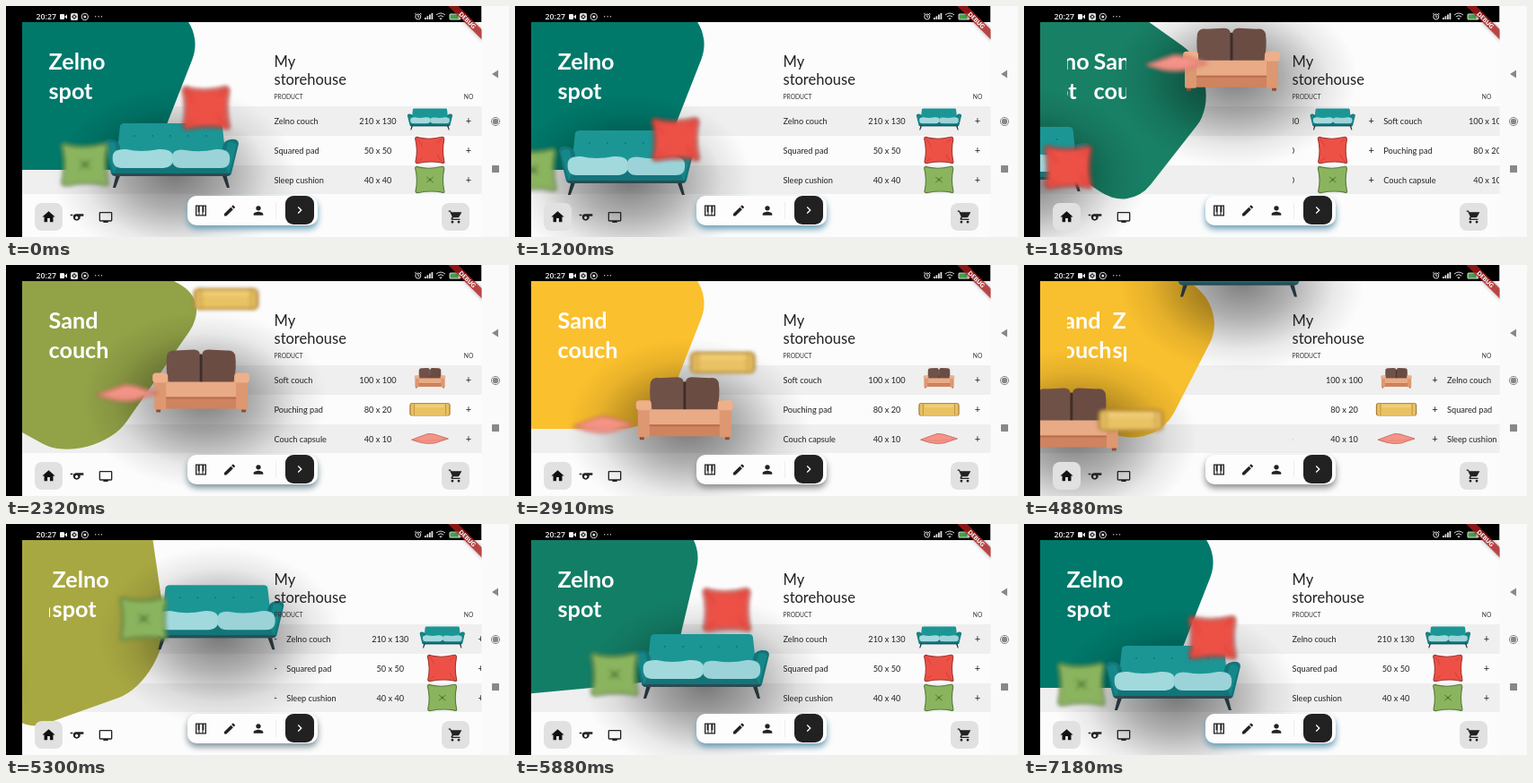
These frames come from a looping animation (560 px wide and 258 px high, 7.26 s). An HTML page with a canvas:

```html
<!DOCTYPE html>
<html lang="en">
<head>
<meta charset="utf-8">
<title>Sofa store</title>
<style>
html, body { margin: 0; width: 100%; height: 100%; overflow: hidden; background: #fafafa; }
canvas { display: block; width: 560px; height: 258px; }
</style>
</head>
<body>
<canvas id="stage"></canvas>
<script>
const W = 560, H = 258, LOOP = 7260, PERIOD = 3200;
const canvas = document.getElementById('stage');
const ctx = canvas.getContext('2d');
const dpr = window.devicePixelRatio || 1;
canvas.width = W * dpr;
canvas.height = H * dpr;

// Drift of each piece around its resting place: [phase ms, dx, dy]
const PATHS = {
  sofa: [[1300, 40, -330], [1680, 55, -168], [1850, 55, -104], [2680, 24, -8], [3200, 0, 0],
    [3980, -18, 5], [4400, -60, 8], [4880, -123, 9], [5050, -186, 4], [5400, -330, -10]],
  right: [[1300, 10, -460], [1680, 22, -310], [1850, 27, -225], [2680, 13, -18], [3200, 0, 0],
    [3980, -13, 13], [4400, -44, 35], [4880, -105, 57], [5050, -173, 66], [5400, -330, 70]],
  left: [[1300, 80, -380], [1680, 92, -190], [1850, 83, -118], [2680, 23, -9], [3200, 0, 0],
    [3980, -24, 2], [4400, -68, 6], [4880, -150, 8], [5400, -350, 0]]
};

const TEAL = [0, 121, 107], YELLOW = [251, 192, 45];

const ROOMS = [
  {
    title: ['Zelno', 'spot'],
    sofa: [tealSofa, 184, 131], right: [redPad, 223, 114], left: [greenPad, 88, 177],
    rows: [
      ['Zelno couch', '210 x 130', tealSofa, 0.335, 114.5],
      ['Squared pad', '50 x 50', redPad, 0.63, 161],
      ['Sleep cushion', '40 x 40', greenPad, 0.63, 194]
    ]
  },
  {
    title: ['Sand', 'couch'],
    sofa: [sandSofa, 176, 128.5], right: [rollPad, 224, 116], left: [capsule, 87, 181.5],
    rows: [
      ['Soft couch', '100 x 100', sandSofa, 0.32, 115],
      ['Pouching pad', '80 x 20', rollPad, 0.63, 161],
      ['Couch capsule', '40 x 10', capsule, 0.62, 194]
    ]
  }
];

const ICONS = {
  home: 'M10 20v-6h4v6h5v-8h3L12 3 2 12h3v8z',
  whistle: 'M10 7h13v4h-5.5a6 6 0 1 1-10.5-2.6zM1 8h4v2H1zM11.5 11a2.5 2.5 0 1 0 .01 0z',
  tv: 'M3 3h18a2 2 0 0 1 2 2v12a2 2 0 0 1-2 2h-5v2H8v-2H3a2 2 0 0 1-2-2V5a2 2 0 0 1 2-2zM3 5v12h18V5z',
  piano: 'M3 3h18v18H3zM5 5v14h3.2v-4.5H7V5zM10 5v9.5h-.2V19h4.4v-4.5H14V5zM17 5v9.5h-1.2V19H19V5z',
  edit: 'M3 17.25V21h3.75L17.8 9.94l-3.75-3.75zM20.7 7.04a1 1 0 0 0 0-1.41l-2.34-2.34a1 1 0 0 0-1.41 0l-1.83 1.83 3.75 3.75z',
  person: 'M12 12a4 4 0 1 0 0-8 4 4 0 0 0 0 8zm0 2c-2.67 0-8 1.34-8 4v2h16v-2c0-2.66-5.33-4-8-4z',
  next: 'M10 6L8.6 7.4 13.2 12l-4.6 4.6L10 18l6-6z',
  cart: 'M7 18a2 2 0 1 0 .01 0zM17 18a2 2 0 1 0 .01 0zM1 2v2h2l3.6 7.6-1.35 2.4C4.5 15.4 5.5 17 7 17h12v-2H7.4l1-2h7.4c.8 0 1.4-.4 1.8-1L21.7 4.5H5.2L4.3 2z'
};

function ease(t, a, b) {
  const u = Math.min(1, Math.max(0, (t - a) / (b - a)));
  return u * u * (3 - 2 * u);
}

// Both page turns added together
function turns(t, a, b) {
  return ease(t, a, b) + ease(t - PERIOD, a, b);
}

// Smooth curve through the keys that never overshoots them
function along(keys, t) {
  let i = 0;
  while (i < keys.length - 2 && t > keys[i + 1][0]) i++;
  const a = keys[i], b = keys[i + 1];
  const before = keys[i - 1], after = keys[i + 2];
  const span = b[0] - a[0], u = (t - a[0]) / span, v = 1 - u;
  const slope = (p, q, k) => (q[k] - p[k]) / (q[0] - p[0]);
  const mean = (p, q) => p * q > 0 ? 2 * p * q / (p + q) : 0;
  return [1, 2].map(k => {
    const mid = slope(a, b, k);
    const ma = (before ? mean(slope(before, a, k), mid) : mid) * span;
    const mb = (after ? mean(mid, slope(b, after, k)) : mid) * span;
    return a[k] * (1 + 2 * u) * v * v + ma * u * v * v + b[k] * u * u * (3 - 2 * u) - mb * u * u * v;
  });
}

function blend(a, b, k) {
  return `rgb(${a.map((v, i) => Math.round(v + (b[i] - v) * k)).join()})`;
}

function box(x, y, w, h, r, fill) {
  ctx.fillStyle = fill;
  ctx.beginPath();
  ctx.roundRect(x, y, w, h, r);
  ctx.fill();
}

function shape(d, fill, line) {
  const p = new Path2D(d);
  if (fill) { ctx.fillStyle = fill; ctx.fill(p, 'evenodd'); }
  if (line) { ctx.strokeStyle = line; ctx.stroke(p); }
}

function at(x, y, scale, draw) {
  ctx.save();
  ctx.translate(x, y);
  ctx.scale(scale, scale);
  draw();
  ctx.restore();
}

function clipped(x, y, w, h, draw) {
  ctx.save();
  ctx.beginPath();
  ctx.rect(x, y, w, h);
  ctx.clip();
  draw();
  ctx.restore();
}

function text(s, x, y, size, color, weight = 400, align = 'left') {
  ctx.font = `${weight} ${size}px Lato, sans-serif`;
  ctx.textAlign = align;
  ctx.fillStyle = color;
  ctx.fillText(s, x, y);
}

function icon(name, x, y, color = '#222', size = 16) {
  at(x - size / 2, y - size / 2, size / 24, () => shape(ICONS[name], color));
}

// Sofas hang from their top centre, pads sit around their middle
function tealSofa() {
  shape('M-61 56l-4 16h3l6-16zM61 56l4 16h-3l-6-16z', '#26343a');
  shape('M-57 3Q-56 0-52 0H52Q57 0 57 4L61 40H-61z', '#1b9695');
  for (let i = 0; i < 5; i++) {
    box(-42 + i * 20, 13, 2, 2, 1, '#0d7678');
  }
  shape('M-75 23Q-75 17-66 18-58 19-57 27L-55 42H55L57 27Q58 19 66 18 75 17 75 23L67 56Q66 59 62 59H-62Q-66 59-67 56z', '#12757a');
  shape('M-73 24Q-69 19-63 22L-58 43-64 56z', '#168789');
  shape('M73 24Q69 19 63 22L58 43 64 56z', '#168789');
  shape('M-66 56H66Q65 59 62 59H-62Q-65 59-66 56z', '#2c4a50');
  shape('M-65 35Q-63 28-50 29-34 33-14 29 0 28 2 36 4 49-9 50H-55Q-67 50-65 35z', '#a2d9dd');
  shape('M1 36Q3 28 16 30 32 33 50 29 63 28 65 36 67 50 55 50H12Q-1 50 1 36z', '#9bd3d8');
}

function sandSofa() {
  box(-50, 64, 5, 6, 1, '#8e4e35');
  box(45, 64, 5, 6, 1, '#8e4e35');
  box(-45, 26, 90, 28, 4, '#d88f69');
  shape('M-38 6Q-36 0-28 1L-8 0Q-1 0-1 7V37H-36Q-40 22-38 6z', '#705148');
  shape('M38 6Q36 0 28 1L8 0Q1 0 1 7V37H36Q40 22 38 6z', '#6b4c43');
  box(-1.5, 5, 3, 32, 1, '#402d2a');
  box(-40, 36, 80, 18, 3, '#e8ab86');
  box(-42, 53, 84, 13, 2, '#cf835f');
  box(-42, 53, 84, 2, 0, '#b86e4e');
  for (const side of [-1, 1]) {
    const x = side < 0 ? -54 : 37;
    box(x + 2, 30, 13, 37, 2, '#dd9871');
    box(x, 26, 17, 11, 4, '#edb08b');
  }
}

const PAD = 'M-26-21Q-24-25-19-22 0-18 19-23 25-25 25-19 21 0 25 19 27 25 20 22 0 19-20 23-27 24-25 18-21 0-26-21z';

function redPad() {
  ctx.lineWidth = 1.8;
  shape(PAD, '#ed5146', '#a03632');
  shape('M-23-20Q-15-12-14-5M22 20Q14 14 13 7M-22 20Q-16 15-13 14M22-20Q16-16 13-13', null, '#d6443b');
}

function greenPad() {
  ctx.lineWidth = 1.8;
  shape(PAD, '#8bb45e', '#587a3d');
  shape('M-6-5L6 5M6-5L-6 5', null, '#5f8640');
  box(-2, -2, 4, 4, 2, '#4c7334');
}

function rollPad() {
  ctx.lineWidth = 1.5;
  box(-36, -11, 72, 23, 5, '#a87c36');
  box(-34, -10, 68, 21, 3, '#e9c263');
  shape('M-28-11V11M28-11V11', null, '#bd9342');
  box(-26, -7, 52, 4, 2, '#f1cf7d');
}

function capsule() {
  ctx.lineWidth = 1.4;
  shape('M-33 2Q-18-4-3-9 8-9 17-5L33 0Q20 4 9 8-5 10-17 7z', '#f69488', '#c4665c');
  shape('M-30 2Q0 6 30 0', null, '#e3867a');
}

function blob(t) {
  const mix = ease(t, 1600, 2900) - ease(t - PERIOD, 1600, 2900);
  const angle = Math.PI * turns(t, 1465, 2820);
  ctx.save();
  ctx.translate(80, 90);
  ctx.rotate(angle);
  ctx.transform(1, 0, 0.6 * Math.abs(Math.sin(angle)), 1, 0, 0);
  const pts = [[152, -93], [79, 93], [-152, 93], [-79, -93]];
  ctx.beginPath();
  ctx.moveTo(0, -93);
  pts.forEach((p, i) => {
    ctx.arcTo(...p, ...pts[(i + 1) % 4], i % 2 ? 62 : 46);
  });
  ctx.closePath();
  ctx.fillStyle = blend(TEAL, YELLOW, mix);
  ctx.fill();
  ctx.restore();
  return mix;
}

function shade(x, y) {
  ctx.save();
  ctx.translate(x, y);
  ctx.scale(1.3, 0.95);
  const g = ctx.createRadialGradient(0, 0, 0, 0, 0, 105);
  g.addColorStop(0, 'rgba(0,0,0,.5)');
  g.addColorStop(0.4, 'rgba(0,0,0,.3)');
  g.addColorStop(0.75, 'rgba(0,0,0,.08)');
  g.addColorStop(1, 'rgba(0,0,0,0)');
  ctx.fillStyle = g;
  ctx.fillRect(-105, -105, 210, 210);
  ctx.restore();
}

function furniture(room, phase) {
  if (phase < 1300 || phase > 5400) return;
  const place = part => {
    const [draw, x, y] = room[part], [dx, dy] = along(PATHS[part], phase);
    return [x + dx, y + dy, 1, draw];
  };
  const sofa = place('sofa');
  shade(sofa[0] + 4, sofa[1] + 56);
  at(...sofa);
  ctx.save();
  ctx.filter = `blur(${1.9 * dpr}px)`;
  at(...place('left'));
  at(...place('right'));
  ctx.restore();
}

function table(page) {
  text('My', 298.5, 67.5, 16.5, '#222');
  text('storehouse', 298.5, 87.5, 16.5, '#222');
  text('PRODUCT', 298.5, 104, 6.7, '#333');
  text('NO', 515, 104, 6.7, '#333', 400, 'center');
  clipped(299, 110, 230, 102, () => {
    for (let i = 0; i < 3; i++) {
      const x = (i - page) * 230;
      if (Math.abs(x) >= 230) continue;
      ROOMS[i % 2].rows.forEach(([name, size, draw, scale, y], n) => {
        const base = 131.7 + n * 33;
        text(name, x + 298.5, base, 9.2, '#222');
        text(size, x + 414, base, 9.2, '#222', 400, 'center');
        text('+', x + 515, base, 11, '#222', 400, 'center');
        at(x + 472, y, scale, draw);
      });
    }
  });
}

function titles(page) {
  clipped(48, 40, 66, 76, () => {
    for (let i = 0; i < 3; i++) {
      const x = 47.5 + (i - page) * 68;
      ROOMS[i % 2].title.forEach((s, n) => text(s, x, 71 + n * 33, 25.2, '#fff', 700));
    }
  });
}

function dock(mix) {
  box(32, 220, 31, 31, 8, '#e1e1e1');
  icon('home', 47.5, 235.5, '#111', 17);
  icon('whistle', 79, 235.5);
  icon('tv', 111, 236);
  box(485, 220, 31, 31, 8, '#e1e1e1');
  icon('cart', 500.5, 235.5, '#222', 17);
  ctx.save();
  ctx.shadowColor = blend([105, 160, 185], [140, 140, 140], mix);
  ctx.shadowBlur = 7 * dpr;
  ctx.shadowOffsetY = 4 * dpr;
  box(202, 212, 145, 33, 10, '#fdfdfd');
  ctx.restore();
  icon('piano', 217, 228.5);
  icon('edit', 249, 228.5);
  icon('person', 281, 228.5);
  box(300, 219, 1, 19, 0, '#eee');
  box(311, 212, 32, 32, 9, '#212121');
  icon('next', 327, 228, '#fff');
}

function systemBars() {
  ctx.fillStyle = '#000';
  ctx.fillRect(0, 0, 529.5, 18);
  ctx.fillRect(0, 0, 18, H);
  ctx.font = '600 8.8px "Open Sans", sans-serif';
  ctx.textAlign = 'left';
  ctx.fillStyle = '#eee';
  ctx.fillText('20:27', 33.5, 15);
  box(60, 9, 5, 6, 1, '#eee');
  shape('M65 12l3-2.5v5z', '#eee');
  ctx.lineWidth = 1;
  box(72, 8, 8, 8, 1.5, '#ddd');
  shape('M76 9l3 3-3 3-3-3z', '#333');
  box(75, 11, 2, 2, 1, '#eee');
  shape('M91.5 12a3.7 3.7 0 1 1-7.4 0 3.7 3.7 0 1 1 7.4 0z', null, '#ddd');
  box(86.3, 10.5, 3, 3, 1.5, '#ddd');
  for (let i = 0; i < 3; i++) box(99 + i * 3.4, 11, 1.4, 1.4, 0.7, '#ccc');

  shape('M461.8 12a3 3 0 1 1-6 0 3 3 0 1 1 6 0zM458.8 10v2.3h1.5M455 9.3l1.6-1.3M462.6 9.3l-1.6-1.3', null, '#ddd');
  for (let i = 0; i < 4; i++) box(466 + i * 2.5, 13 - i * 1.7, 1.8, 2 + i * 1.7, 0, '#ddd');
  shape('M479 10Q484 6 489 10M480.8 12Q484 9.4 487.2 12', null, '#ddd');
  shape('M482.2 13.5h3.6L484 15.5z', '#ddd');
  box(493.5, 8.5, 13, 7, 1.5, '#ddd');
  box(494.5, 9.5, 9, 5, 0.5, '#45a049');
  box(507, 10.5, 1.5, 3, 0, '#ddd');

  ctx.fillStyle = '#fafafa';
  ctx.fillRect(529.5, 0, 30.5, H);
  shape('M548 71.5v9l-7-4.5z', '#888');
  shape('M549.6 129a4.6 4.6 0 1 1-9.2 0 4.6 4.6 0 1 1 9.2 0z', null, '#888');
  box(541.8, 125.8, 6.4, 6.4, 3.2, '#888');
  box(541, 178, 8, 8, 0.5, '#888');
}

function ribbon() {
  clipped(480, 0, 49.5, 45, () => {
    ctx.translate(529.5, 0);
    ctx.rotate(Math.PI / 4);
    ctx.save();
    ctx.shadowColor = 'rgba(0,0,0,.4)';
    ctx.shadowBlur = 4 * dpr;
    box(-30, 18.4, 60, 8, 0, 'rgba(183,28,28,.75)');
    ctx.restore();
    text('DEBUG', 0, 24.8, 6.6, '#fff', 900, 'center');
  });
}

function draw(t) {
  ctx.setTransform(dpr, 0, 0, dpr, 0, 0);
  ctx.fillStyle = '#fcfcfc';
  ctx.fillRect(0, 0, W, H);
  ctx.fillStyle = '#efefef';
  ctx.fillRect(18, 112, 512, 33);
  ctx.fillRect(18, 178, 512, 32);
  const page = turns(t, 1420, 2220);
  clipped(18, 18, 511.5, 240, () => {
    const mix = blob(t);
    titles(page);
    for (let i = 0; i < 3; i++) furniture(ROOMS[i % 2], t + PERIOD * (1 - i));
    table(page);
    dock(mix);
  });
  systemBars();
  ribbon();
}

const start = performance.now();
function tick() {
  draw((performance.now() - start) % LOOP);
  requestAnimationFrame(tick);
}
tick();
</script>
</body>
</html>
```
